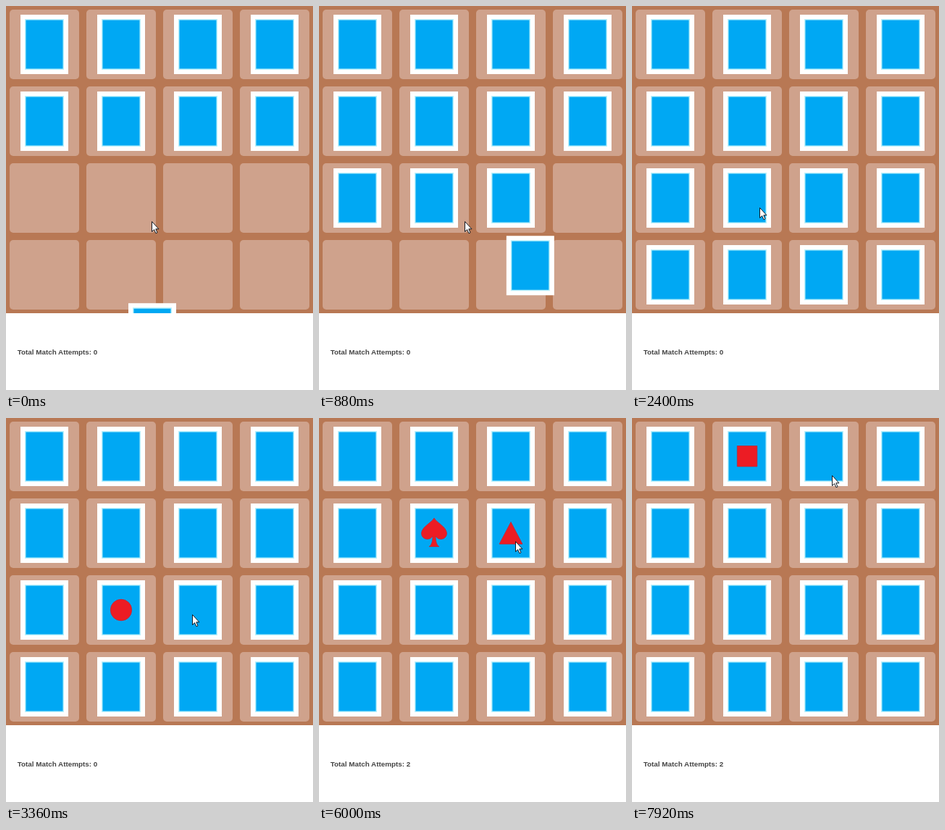
An HTML page that plays this animation: 424 px wide and 530 px high, repeating every 8 s.

```html
<!DOCTYPE html>
<html lang="en">
<head>
<meta charset="utf-8">
<title>Memory game</title>
<style>
html, body { margin: 0; width: 100%; height: 100%; overflow: hidden; background: #fff; }
svg { display: block; }
text { font: bold 9.85px Arial, "Liberation Sans", sans-serif; fill: #444; }
.face { fill: #ec1c24; stroke: #c8222f; stroke-width: .7; stroke-linejoin: round; }
</style>
</head>
<body>
<svg id="stage" width="424" height="530" viewBox="0 0 424 530">
  <defs>
    <g id="back">
      <rect width="66" height="82" fill="#fff"/>
      <rect x="6" y="6" width="54" height="70" fill="#b9f0fb"/>
      <rect x="7.5" y="7.5" width="51" height="67" fill="#00a8f3"/>
    </g>
    <circle id="circle" cx="33" cy="41" r="14.7"/>
    <rect id="square" x="19.3" y="26.5" width="27.5" height="28.5"/>
    <path id="triangle" d="M33 25.5L49 56H17Z"/>
    <path id="spade" d="M33 20C36 26 50 32 50.5 41C50.5 50 39 52 35 45C35 53 37 58 40 59.5H26C29 58 31 53 31 45C27 52 15.5 50 15.5 41C16 32 30 26 33 20Z"/>
  </defs>
  <rect width="424" height="424" fill="#b87854"/>
  <g id="cells" fill="#cfa28c"></g>
  <g id="cards"></g>
  <rect y="424" width="424" height="106" fill="#fff"/>
  <text id="score" x="15.8" y="481"></text>
  <path id="cursor" d="M-.5 .5V14.5L2.6 11.6L4.9 16.7L7 15.8L4.8 10.8H9Z" fill="#fff" stroke="#151a22"/>
</svg>
<script>
const NS = "http://www.w3.org/2000/svg";
const LOOP = 8000, STEP = 80;
const FLIGHT = 255, GAP = 256, FLIP = 280, SHOWN = 1040;
const PAUSE = 160, TRAVEL = 700, SETTLE = 60;
const $ = id => document.getElementById(id);
const clamp = v => Math.max(0, Math.min(1, v));
const smooth = p => p * p * (3 - 2 * p);
const mix = (a, b, p) => a + (b - a) * p;

function add(parent, tag, attrs) {
  const el = document.createElementNS(NS, tag);
  for (const k in attrs) el.setAttribute(k, attrs[k]);
  return parent.appendChild(el);
}

// Clicks come in pairs; each has its time and the pointer position.
const clicks = [
  { card: 9, symbol: "circle", time: 2560, x: 165, y: 268 },
  { card: 10, symbol: "square", time: 3460, x: 259, y: 271 },
  { card: 5, symbol: "spade", time: 5060, x: 158, y: 171 },
  { card: 6, symbol: "triangle", time: 5620, x: 272, y: 170 },
  { card: 1, symbol: "square", time: 7400, x: 160, y: 46 }
];
const rest = { time: 2080, x: 202, y: 297 };
const stops = [rest, ...clicks, { time: 7860, x: 277, y: 79 }];

clicks.forEach((c, i) => {
  const second = clicks[i | 1];
  c.down = second ? second.time + SHOWN : Infinity;
});

const cards = Array.from({ length: 16 }, (_, i) => {
  const left = 106 * (i % 4), top = 106 * (i >> 2);
  add($("cells"), "rect", { x: left + 5, y: top + 5, width: 96, height: 96, rx: 5 });
  const g = add($("cards"), "g", {});
  add(g, "use", { href: "#back" });
  const click = clicks.find(c => c.card === i);
  const face = click && add(g, "use", { href: "#" + click.symbol, class: "face" });
  return { g, click, face, x: left + 20, y: top + 12, dealt: (i - 8) * GAP - 16 };
});

function drawCard(c, t) {
  const p = clamp((t - c.dealt) / FLIGHT);
  const bow = 0.04 * Math.abs(c.x - 179) * Math.sin(Math.PI * p);
  const x = mix(179, c.x, p), y = mix(424, c.y, p) - bow;
  let sx = 1, sy = 1;
  if (c.click) {
    const up = clamp((t - c.click.time) / FLIP);
    const turn = up - clamp((t - c.click.down) / FLIP);
    sx = Math.max(0.02, Math.abs(Math.cos(Math.PI * turn)));
    sy = 1 + 0.14 * Math.sin(Math.PI * up);
    c.face.setAttribute("visibility", turn > 0.5 ? "visible" : "hidden");
  }
  c.g.setAttribute("visibility", t < c.dealt ? "hidden" : "inherit");
  c.g.setAttribute("transform",
    `translate(${x + 33} ${y + 41}) scale(${sx} ${sy}) translate(-33 -41)`);
}

// The pointer waits after a click, then reaches the next spot just in time.
function drawCursor(t) {
  let { x, y } = rest;
  for (let i = 1; i < stops.length; i++) {
    const end = stops[i].time - SETTLE;
    const begin = Math.max(stops[i - 1].time + PAUSE, end - TRAVEL);
    const p = smooth(clamp((t - begin) / (end - begin)));
    x = mix(x, stops[i].x, p);
    y = mix(y, stops[i].y, p);
  }
  $("cursor").setAttribute("transform", `translate(${Math.round(x)} ${Math.round(y)})`);
}

function draw(t) {
  cards.forEach(c => drawCard(c, t));
  const tries = clicks.filter((c, i) => i % 2 && t >= c.time + FLIP).length;
  $("score").textContent = "Total Match Attempts: " + tries;
  drawCursor(t);
}

const start = performance.now();
function tick() {
  const t = (performance.now() - start) % LOOP;
  draw(Math.floor(t / STEP) * STEP);
  requestAnimationFrame(tick);
}
tick();
</script>
</body>
</html>
```
